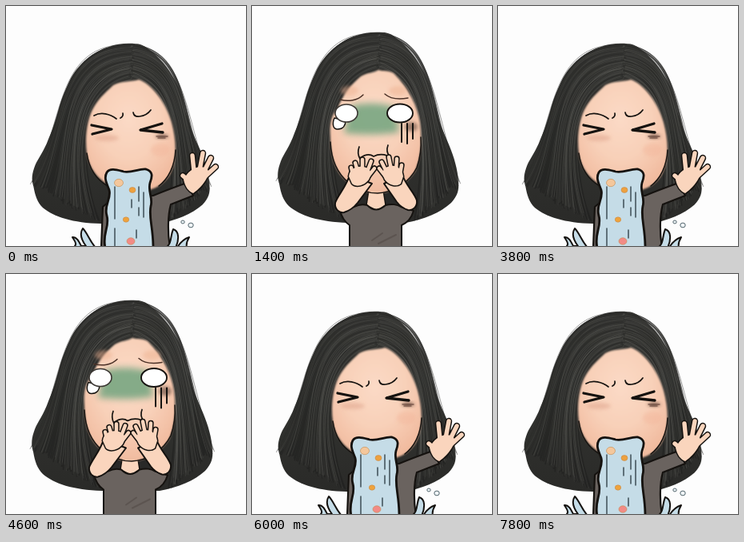
These frames come from a looping animation (300 by 300 pixels, 8 s). An HTML page:

```html
<!DOCTYPE html>
<html lang="en">
<head>
<meta charset="utf-8">
<title>Queasy</title>
<style>
html, body { margin: 0; width: 100%; height: 100%; overflow: hidden; background: #fdfdfd; }
svg { display: block; width: 100%; height: 100%; }
</style>
</head>
<body>
<svg id="stage" viewBox="0 0 300 300">
  <defs>
    <radialGradient id="skin" cx=".48" cy=".35" r=".65">
      <stop offset="0" stop-color="#fbdac6"/>
      <stop offset=".55" stop-color="#f8d0b8"/>
      <stop offset="1" stop-color="#f1bb9f"/>
    </radialGradient>
    <linearGradient id="hair" x2="0" y2="1">
      <stop offset="0" stop-color="#3d3d3a"/>
      <stop offset=".5" stop-color="#323330"/>
      <stop offset="1" stop-color="#2a2a28"/>
    </linearGradient>
    <filter id="edge"><feGaussianBlur stdDeviation=".8"/></filter>
    <filter id="soft" x="-50%" y="-50%" width="200%" height="200%"><feGaussianBlur stdDeviation="2"/></filter>
    <filter id="haze" x="-50%" y="-50%" width="200%" height="200%"><feGaussianBlur stdDeviation="4.5"/></filter>
  </defs>
</svg>
<script>
const INK = '#15120f', SKIN = '#fad5bd', SHIRT = '#6a635f', WATER = '#c5dce7';
const STEP = 200, LOOP = 8000, HEAVE = 7, CYCLE = 13;

let seed = 7;
const random = () => (seed = seed * 16807 % 2147483647) / 2147483647;

const shape = (d, fill, line = 2, extra = '') =>
  `<path d="${d}" fill="${fill}" stroke="${line ? INK : 'none'}" stroke-width="${line}" stroke-linejoin="round" ${extra}/>`;
const stroke = (d, width, color = INK) =>
  `<path d="${d}" fill="none" stroke="${color}" stroke-width="${width}" stroke-linecap="round" stroke-linejoin="round"/>`;
const oval = (x, y, rx, ry, fill, extra = '') =>
  `<ellipse cx="${x}" cy="${y}" rx="${rx}" ry="${ry}" fill="${fill}" ${extra}/>`;
const place = (transform, body) => `<g transform="${transform}">${body}</g>`;

// Strands blend between an outer and an inner cubic of eight coordinates.
function strands([outer, inner], count, color, width, lo = 0, hi = 1) {
  let d = '';
  for (let i = 0; i < count; i++) {
    const t = lo + (hi - lo) * random();
    const p = outer.map((v, k) => (v + (inner[k] - v) * t + (random() - .5) * (k < 2 ? 4 : 8)).toFixed(1));
    d += `M${p[0]} ${p[1]}C${p.slice(2).join(' ')}`;
  }
  return stroke(d, width, color);
}

const locks = [
  [[158, 35, 60, 34, 74, 142, 34, 216], [156, 80, 92, 98, 88, 190, 116, 266]],
  [[162, 35, 232, 44, 222, 130, 257, 220], [159, 80, 214, 95, 217, 180, 204, 265]]
];

const hair = shape(
  'M164 33C152 32 140 33 130 37C112 42 90 60 80 82C72 100 69 108 66 120C62 135 58 147 53 159C47 176 40 184 36 194C32 205 31 212 34 222C36 234 39 243 46 250C60 262 84 270 120 271L192 271C215 267 236 258 249 246C257 237 259 230 258 220C257 204 253 190 246 173C239 157 233 142 227 122C224 106 221 94 214 81C206 66 194 50 180 40C175 35 169 33 164 33Z',
  'url(#hair)', 0) + locks.map(lock =>
    strands(lock, 60, 'rgba(18,18,18,.3)', 1.6) +
    strands(lock, 40, 'rgba(110,110,104,.2)', 1) +
    strands(lock, 12, 'rgba(45,45,42,.6)', .8, -.02, .06)).join('');

// Fingers are fat outlined lines that merge into the palm.
function hand(palm, fingers, width) {
  const d = fingers.map(([x1, y1, x2, y2]) => `M${x1} ${y1}L${x2} ${y2}`).join('');
  return stroke(d, width + 3) + shape(palm, SKIN, 3) + stroke(d, width, SKIN) + shape(palm, SKIN, 0);
}

const face = (d, jaw) => shape(d, 'url(#skin)', 0, 'filter="url(#edge)"') + stroke(jaw, 1.5);

const heaveHair = place('translate(1 16) scale(.982 .945)', hair);

const heaveFace =
  face('M134 99C146 93 157 95 166 92C183 98 200 121 207 146C213 168 214 190 206 208C198 225 180 233 157 233C130 230 105 213 101 184C98 162 102 139 110 126C117 114 127 106 134 99Z',
    'M212 180C211 200 203 216 191 225M101 184C104 205 113 217 127 225') +
  oval(126, 165, 15, 4, '#dfa58d', 'opacity=".55" filter="url(#soft)"') +
  oval(193, 180, 12, 8, '#f3b79c', 'opacity=".5" filter="url(#soft)"');

const heaveBody =
  shape('M121 251L132 242L184 237C196 232 212 226 226 221L234 237L206 248C202 262 202 284 205 302L119 302Z', SHIRT, 2.2);

const wavingHand = hand('M222 217C227 207 234 202 243 201C253 202 256 207 251 215C247 223 240 230 234 234C228 232 224 226 222 217Z',
  [[235, 207, 233, 187], [242, 205, 246, 184], [248, 206, 256, 190], [250, 212, 262, 201], [229, 219, 221, 212]], 5.4);

const drop = (x, y, r) => oval(x, y, r, r * .9, '#f0f7fa', `stroke="#53656c" stroke-width="1"`);

function heave({ brows, eyes, spill, ripples, bits, splash, drops }) {
  return heaveHair + heaveBody + heaveFace +
    oval(195, 163, 8, 2.2, '#5e4034', 'opacity=".85" filter="url(#soft)"') +
    stroke('M188 163H202M190 165H199', 1.4, 'rgba(80,50,40,.6)') +
    stroke(brows, 1.7) + stroke(eyes, 3.3) +
    shape(splash, WATER, 2) +
    shape(spill, WATER, 2.8) + stroke(ripples, 1.4, '#34434b') +
    bits.map(([x, y, r, c]) => oval(x, y, r, r * .85, c, `stroke="#c58a4d" stroke-width=".6"`)).join('') +
    wavingHand + drops.map(p => drop(...p)).join('');
}

const heaveA = heave({
  brows: 'M110 137C119 132 130 135 138 141M143 140Q147 138 146 134M159 133Q160 139 167 138Q176 137 181 130',
  eyes: 'M107 149L132 154L108 160M195 147L168 155L196 158',
  spill: 'M126 208C130 202 139 205 147 207C157 209 166 203 175 204C184 207 183 213 180 221C177 232 184 240 181 250C178 264 184 276 184 302L124 302C120 284 130 276 126 262C122 249 132 241 129 230C126 222 122 215 126 208Z',
  ripples: 'M136 226V266M136 278V300M157 242V252M166 226V244M166 252V262M172 233V264M163 280V290',
  bits: [[141, 221, 5.5, '#f4c79c'], [158, 230, 4, '#eea13e'], [150, 267, 3.7, '#efa33c'], [156, 294, 5, '#f28b86']],
  splash: 'M83 289C88 288 91 294 94 300L100 300C94 292 92 284 96 278C102 284 104 293 112 302H84C90 298 86 294 83 289ZM200 302C208 296 205 288 209 279C216 281 217 291 212 302ZM214 302C218 295 223 291 229 289C226 294 225 298 226 302Z',
  drops: [[231, 274, 3.2], [221, 270, 2.2]]
});

const heaveB = heave({
  brows: 'M111 137C120 131 132 133 140 138M143 138Q147 136 146 132M158 131Q161 137 167 136Q176 130 181 132',
  eyes: 'M106 146L133 152L107 158M196 145L168 152L196 158',
  spill: 'M127 208C130 202 139 203 148 206C156 208 164 203 173 203C183 204 184 211 181 220C178 240 180 273 184 302L125 302C130 278 131 253 130 236C130 224 124 216 127 208Z',
  ripples: 'M138 221V242M135 258V284M149 235V249M158 222V233M166 219V252M171 256V281M158 280V300',
  bits: [[145, 222, 4.7, '#f18079'], [172, 241, 4, '#f4c596'], [155, 269, 5, '#ee9f31'], [154, 284, 3, '#f4d1a8']],
  splash: 'M91 286C98 287 104 292 108 301L95 302C96 295 94 290 91 286ZM204 302C211 292 222 284 236 276C236 285 231 292 233 302Z',
  drops: [[79, 284, 3.2], [248, 294, 3.2]]
});

const sickFace =
  face('M158 80C152 84 144 83 136 88C124 98 113 112 107 128C98 138 97 150 98 164C98 186 103 203 114 215C127 228 142 234 157 234C176 233 194 222 204 206C211 190 213 168 210 146C207 126 197 104 177 84C170 80 164 82 158 80Z',
    'M98 170C99 192 106 209 121 221C134 231 145 234 157 234C178 233 197 220 206 202C211 188 212 178 211 164');

const rightArm = shape('M188 211C192 224 203 233 206 243C207 251 201 256 195 255C189 253 184 249 181 245L165 222Z', SKIN, 2);
const leftArm = shape('M122 211C119 224 107 237 104 246C103 254 109 259 115 258C122 256 128 251 132 246L150 222Z', SKIN, 2);

const sickBody =
  shape('M128 233H182L180 250H131Z', '#292928', 0) +
  shape('M146 230H164L167 249L156 256L143 249Z', SKIN, 1.5) +
  shape('M128 251C135 247 140 248 144 249Q155 260 167 249C174 247 182 248 186 251L202 256C199 266 194 271 187 274V312H122V274C116 270 112 264 110 255Z', SHIRT, 2) +
  stroke('M150 293L163 284M158 297L180 286', 2, 'rgba(60,52,48,.3)');

const sickArms = leftArm + rightArm +
  hand('M121 213C122 204 130 200 138 201C148 202 151 208 146 217C140 225 130 227 125 222Z',
    [[126, 210, 124, 202], [132, 206, 129, 196], [138, 205, 138, 192], [144, 207, 149, 194], [146, 212, 153, 203]], 4.4) +
  hand('M189 213C188 204 181 199 174 200C164 201 161 207 166 217C172 225 181 226 186 222Z',
    [[185, 210, 187, 199], [180, 206, 181, 191], [174, 204, 171, 189], [168, 207, 162, 195], [166, 212, 159, 203]], 4.4);

const sickFeatures =
  oval(122, 106, 11, 6, '#eeb292', 'opacity=".5" filter="url(#soft)"') +
  oval(182, 106, 11, 6, '#eeb292', 'opacity=".5" filter="url(#soft)"') +
  shape('M115 159L123 125Q150 118 178 126L184 158Q150 163 115 159Z', '#7fa985', 0, 'opacity=".95" filter="url(#haze)"') +
  oval(199, 151, 8, 6, '#74594b', 'opacity=".7" filter="url(#soft)"') +
  stroke('M187 147V170M194 147V172M201 147V166', 2) +
  shape('M103 140C100 147 101 154 107 154C114 154 117 149 117 143Z', '#fff', 1.5) +
  oval(118, 134, 14, 11, '#fff', 'stroke="#3b3733" stroke-width="1.6"') +
  oval(185, 134, 16, 11.5, '#fff', `stroke="${INK}" stroke-width="1.9"`) +
  stroke('M110 117C121 120 132 118 139 111M166 110C174 117 184 117 195 115', 1.5, '#4a3026') +
  stroke('M134 176Q131 184 135 191M170 174Q167 182 172 188M135 190Q145 183 152 188Q160 184 169 187', 1.7);

const sick = dy => hair + place(`translate(0 ${dy})`, sickBody) + sickFace +
  place(`translate(0 ${dy})`, sickFeatures + sickArms);

const stage = document.getElementById('stage');
const poses = [heaveA, heaveB, sick(0), sick(-4.5)].map(body => {
  const group = document.createElementNS('http://www.w3.org/2000/svg', 'g');
  group.innerHTML = body;
  stage.append(group);
  return group;
});

function poseAt(time) {
  const beat = Math.floor(time % LOOP / STEP) % CYCLE;
  return beat < HEAVE ? beat % 2 : 2 + (beat - HEAVE) % 2;
}

function draw(time) {
  const current = poseAt(time);
  poses.forEach((group, i) => group.style.display = i === current ? '' : 'none');
}

const start = performance.now();
function tick() {
  draw(performance.now() - start);
  requestAnimationFrame(tick);
}
tick();
</script>
</body>
</html>
```
